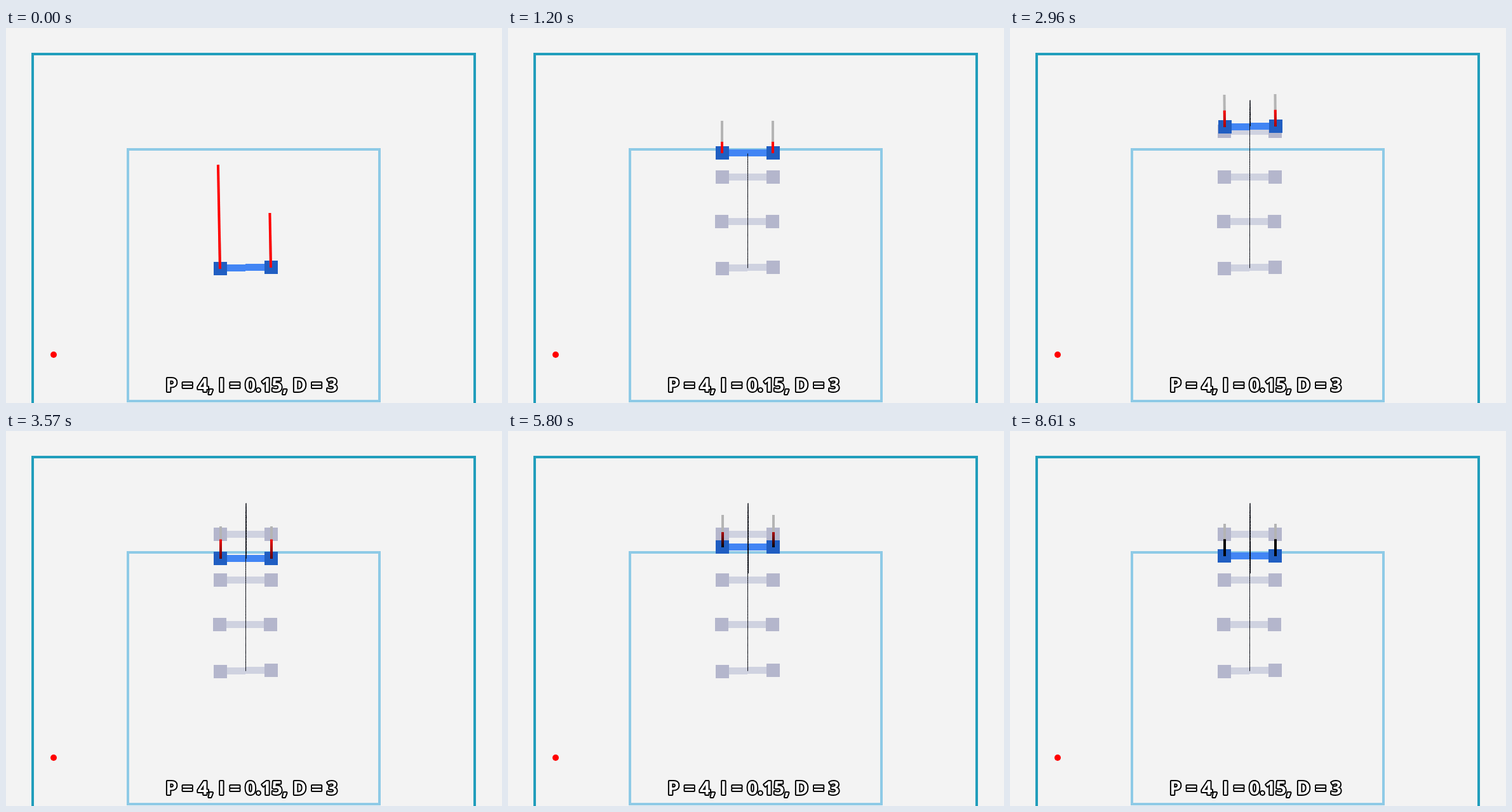
Recreate the animation shown at these times as an HTML page with a canvas. Size 781 by 590 pixels, loop 8.9 s.

```html
<!DOCTYPE html>
<html lang="en">
<head>
<meta charset="utf-8">
<title>Drone altitude control</title>
<style>
  html, body { margin: 0; width: 100%; height: 100%; overflow: hidden; background: #f3f3f3; }
  canvas, svg { position: absolute; left: 0; top: 0; display: block; }
  text {
    font: 700 29.4px "Open Sans", sans-serif;
    fill: #fff; stroke: #000; stroke-width: 4; stroke-linejoin: round;
    paint-order: stroke; white-space: pre;
  }
</style>
</head>
<body>
<canvas id="stage" width="781" height="590"></canvas>
<svg width="781" height="590"><text x="251.2" y="571.5">P = 4, I = 0.15, D = 3</text></svg>
<script>
const ctx = document.getElementById('stage').getContext('2d');
const LOOP = 8900, STEP = 67.4, ARM = 40, GOAL = 189.6;

const bump = (t, center, width) => Math.exp(-(((t - center) / width) ** 2));

// Damped swing around the goal, after a short start from rest
function height(t) {
  const u = t / 130;
  const swing = 177 * Math.exp(-t / 2650) * Math.cos(t * Math.PI / 2150 - 0.25);
  const start = (16.2 * (1 + u) - 25 * u * u) * Math.exp(-u);
  return GOAL + swing + start;
}

// Pixels per second, positive downwards
const velocity = t => (height(t + 5) - height(t - 5)) * 100;

// Slight sideways drift, mostly at the turning point
function side(t) {
  const drift = 0.7 / (1 + Math.exp((2160 - t) / 150));
  return 377.2 + drift - 0.6 * bump(t, 540, 300) + 0.3 * bump(t, 2900, 300);
}

const tilt = t => -0.0187 * Math.exp(-t / 100) - 0.01 * bump(t, 2960, 300);

const pose = t => ({ x: side(t), y: height(t), a: tilt(t) });

function reachTime(level) {
  let t = 0;
  while (height(t) > level) t++;
  return t;
}

const ghosts = [height(0), 304.5, 234.5, 162.5].map(y => {
  const t = reachTime(y);
  return { ...pose(t), y, t };
});

function box(x, y, w, h, color) {
  ctx.fillStyle = color;
  ctx.fillRect(x, y, w, h);
}

function frame(x, y, w, h, color) {
  ctx.strokeStyle = color;
  ctx.lineWidth = 4;
  ctx.strokeRect(x, y, w, h);
}

// Parts stay on whole pixels, so a tilt shows as small steps
function body({ x, y, a }, bar, block) {
  const left = Math.floor(x);
  const level = offset => Math.floor(y + offset * Math.sin(a));
  for (const s of [-1, 1]) {
    box(left + (s < 0 ? -ARM : 0), level(s * ARM / 2) - 5, ARM, 11, bar);
  }
  for (const s of [-1, 1]) {
    box(left + s * ARM - 10, level(s * ARM) - 10, 21, 21, block);
  }
}

function ray(x, y, length, a, color) {
  ctx.beginPath();
  ctx.moveTo(x, y);
  ctx.lineTo(x + length * Math.sin(a), y - length * Math.cos(a));
  ctx.strokeStyle = color;
  ctx.lineWidth = 4;
  ctx.stroke();
}

const darkRed = amount => `rgb(${Math.round(255 * (1 - Math.min(1, amount)))},0,0)`;

function drawThrust(t, { x, y, a }) {
  const control = 26 + 0.117 * (y - GOAL) + 0.053 * velocity(t);
  const power = control + 77 * Math.exp(-t / 100);
  const bias = 39 * Math.exp(-t / 60);
  const wear = Math.max(0, t - 2200) / 6400;
  for (const s of [-1, 1]) {
    const length = power - s * bias;
    const px = Math.round(x + 0.3) + s * ARM;
    const py = Math.floor(y + s * ARM * Math.sin(a)) + 1;
    const paint = ctx.createLinearGradient(0, py, 0, py - length);
    paint.addColorStop(0, darkRed(3 * wear));
    paint.addColorStop(1, darkRed(wear * wear));
    ray(px, py, 51, a, '#b4b4b4');
    ray(px, py, length, a, paint);
  }
}

function drawTrail(t) {
  ctx.beginPath();
  for (let s = 0; s <= t; s += 16) {
    ctx.lineTo(Math.round(side(s)) + 0.5, height(s) + 0.5);
  }
  ctx.strokeStyle = '#05070f';
  ctx.lineWidth = 1;
  ctx.stroke();
}

function draw(t) {
  box(0, 0, 781, 590, '#f3f3f3');
  frame(42, 41, 696, 700, '#219ebc');
  frame(192, 191, 396, 396, '#8ecae6');

  ctx.fillStyle = '#f00';
  ctx.beginPath();
  ctx.arc(75, 514, 5, 0, 2 * Math.PI);
  ctx.fill();

  for (const ghost of ghosts) {
    if (t >= ghost.t) body(ghost, '#cfd2e0', '#b4b6cc');
  }
  const drone = pose(t);
  body(drone, '#4285f4', '#205ec2');
  drawThrust(t, drone);
  drawTrail(t);
}

// Each picture is held for one step of the recording clock
function held(t) {
  return Math.max(0, Math.floor((t + 16) / STEP) * STEP - 8);
}

const origin = performance.now();
function tick() {
  draw(held((performance.now() - origin) % LOOP));
  requestAnimationFrame(tick);
}
tick();
</script>
</body>
</html>
```
